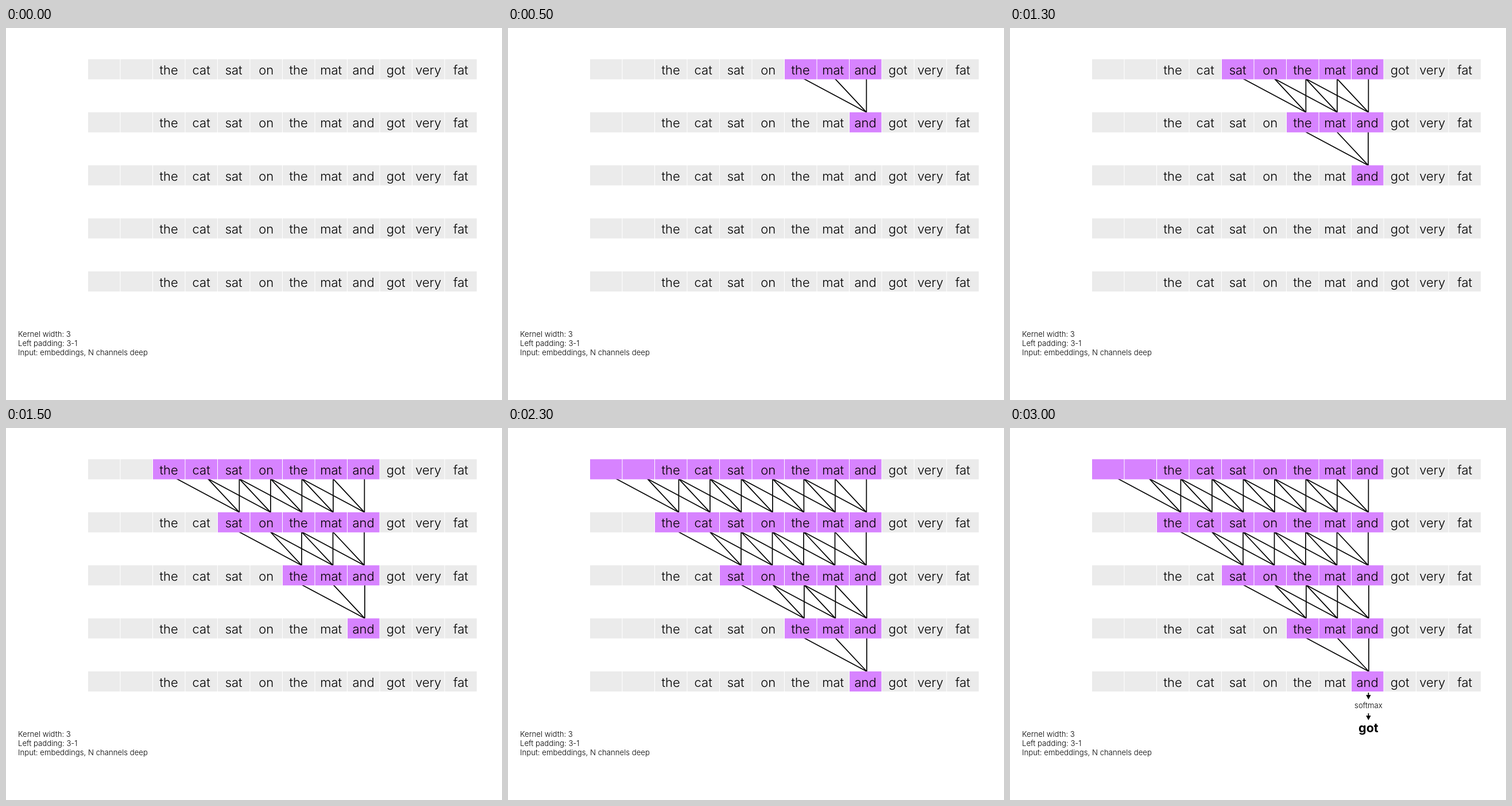
Animation, 864 px wide and 648 px high, one loop 3500 ms. Source, as an HTML page with a canvas:

```html
<!DOCTYPE html>
<html lang="en">
<head>
<meta charset="utf-8">
<title>Causal convolution</title>
<style>
  html, body { margin: 0; width: 100%; height: 100%; overflow: hidden; background: #fff; }
  canvas { display: block; }
</style>
</head>
<body>
<canvas id="stage" width="864" height="648"></canvas>
<script>
const ctx = document.getElementById("stage").getContext("2d");
const STEP = 500, STEPS = 7;
const WORDS = ["", "", ..."the cat sat on the mat and got very fat".split(" ")];
const NOTES = ["Kernel width: 3", "Left padding: 3-1", "Input: embeddings, N channels deep"];
const ROWS = 5, KERNEL = 3, FOCUS = 8;
const LEFT = 143, CELL = 56.5, TOP = 54.4, ROW_GAP = 92.4, BAR = 35;
const LINK_GAP = 54.5, LINK_SHIFT = [0, -0.4, 0.5, 0.5];
const GREY = "#ebebeb", PURPLE = "#d783ff";
const OUT_X = 624.4;

const rowY = row => TOP + row * ROW_GAP;
const firstActive = (row, depth) => FOCUS - (KERNEL - 1) * (depth - row);
const anchorX = (col, row) => OUT_X - (FOCUS - col) * LINK_GAP + LINK_SHIFT[row];

function text(str, x, y, size, weight = 300, align = "center") {
  ctx.font = `${weight} ${size}px Inter, sans-serif`;
  ctx.textAlign = align;
  ctx.fillStyle = "#000";
  ctx.fillText(str, x, y);
}

function line(x1, y1, x2, y2) {
  ctx.beginPath();
  ctx.moveTo(x1, y1);
  ctx.lineTo(x2, y2);
  ctx.stroke();
}

function arrow(y) {
  line(OUT_X, y, OUT_X, y + 5);
  ctx.fillStyle = "#000";
  ctx.beginPath();
  ctx.moveTo(OUT_X - 4.2, y + 4);
  ctx.lineTo(OUT_X + 4.2, y + 4);
  ctx.lineTo(OUT_X, y + 12);
  ctx.fill();
}

function drawRow(row, depth) {
  const y = rowY(row);
  const baseline = Math.floor(y + 27.1);
  WORDS.forEach((word, col) => {
    const active = depth > 0 && row <= depth && col <= FOCUS && col >= firstActive(row, depth);
    const x = LEFT + col * CELL;
    ctx.fillStyle = active ? PURPLE : GREY;
    ctx.fillRect(x, y, CELL - 1, BAR);
    text(word, x + CELL / 2 - 0.6, baseline, 22);
  });
}

// Links start just under the upper bar's edge, so they are drawn before the bars.
function drawLinks(row, depth) {
  const y1 = rowY(row) + BAR - 0.8, y2 = rowY(row + 1);
  for (let col = firstActive(row + 1, depth); col <= FOCUS; col++) {
    for (let k = 0; k < KERNEL; k++) line(anchorX(col - k, row), y1, anchorX(col, row), y2);
  }
}

function draw(step) {
  const depth = Math.min(step, ROWS - 1);
  ctx.fillStyle = "#fff";
  ctx.fillRect(0, 0, 864, 648);
  ctx.strokeStyle = "#000";
  ctx.lineWidth = 1.7;
  for (let row = 0; row < depth; row++) drawLinks(row, depth);
  for (let row = 0; row < ROWS; row++) drawRow(row, depth);
  NOTES.forEach((note, i) => text(note, 21, 538.4 + i * 16, 13.2, 300, "left"));
  if (step >= 5) {
    arrow(461);
    text("softmax", OUT_X, 488.4, 13.2);
  }
  if (step >= 6) {
    arrow(497);
    text("got", OUT_X, 530, 21.5, 700);
  }
}

function tick() {
  draw(Math.floor(performance.now() / STEP) % STEPS);
  requestAnimationFrame(tick);
}
tick();
</script>
</body>
</html>
```
